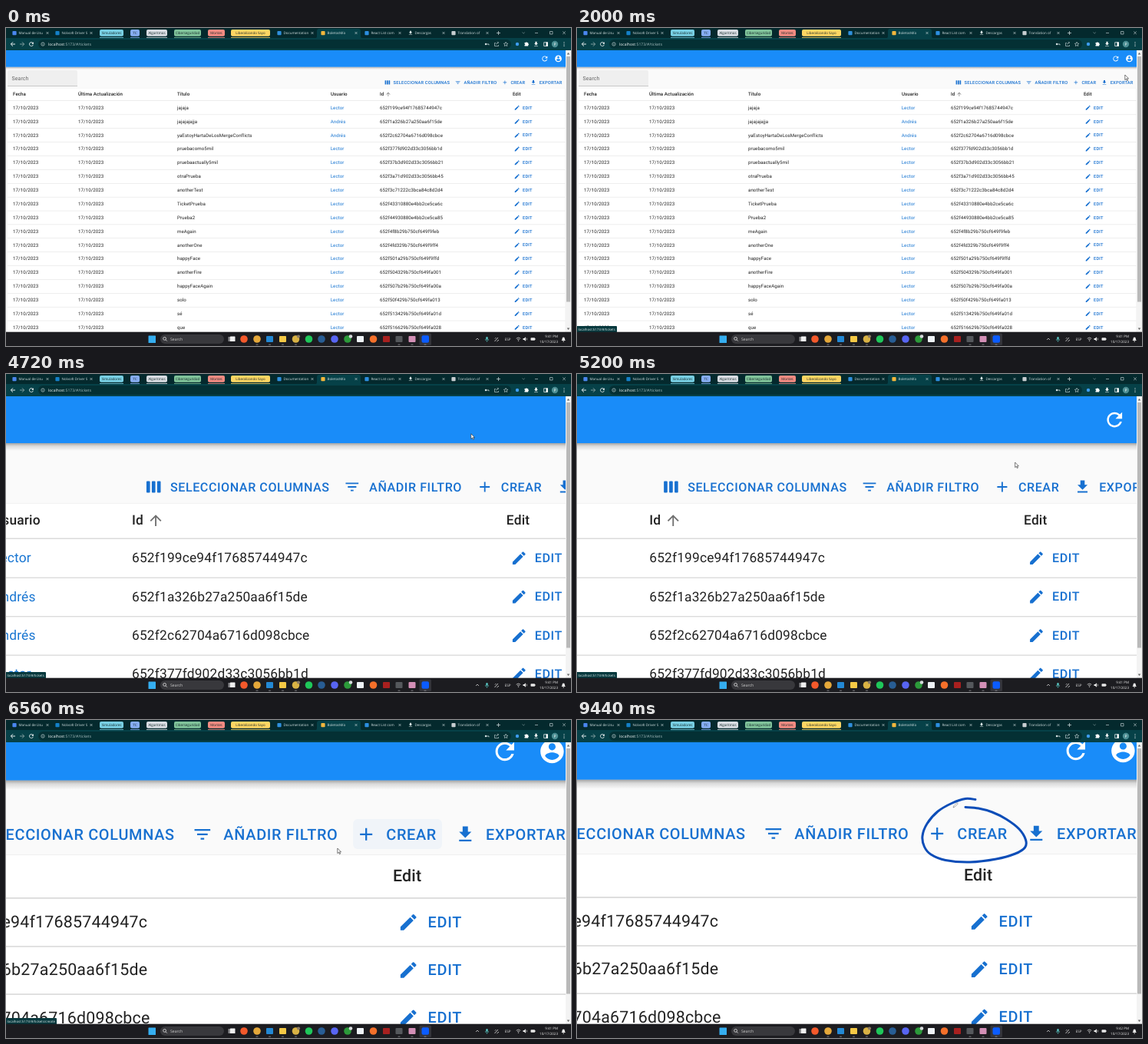
Write an HTML page that moves like this. It is 736 by 414 pixels and loops after 9.52 s.

```html
<!DOCTYPE html>
<html lang="es">
<head>
<meta charset="utf-8">
<style>
html, body { margin: 0; width: 100%; height: 100%; overflow: hidden; background: #fafafa; }
svg { display: block; width: 736px; height: 414px; }
text { text-rendering: geometricPrecision; white-space: pre; }
.cell { font: 400 6.15px Roboto, sans-serif; letter-spacing: .066px; fill: #222; }
.head { font-weight: 500; }
.link { fill: #1976d2; }
.btn { font: 500 5.71px Roboto, sans-serif; letter-spacing: .202px; fill: #1770d0; }
.ui { font-family: "Open Sans", "Noto Sans", sans-serif; }
</style>
</head>
<body>
<svg id="stage" viewBox="0 0 736 414" xmlns="http://www.w3.org/2000/svg"></svg>
<script>
const LOOP = 9520;
const stage = document.getElementById('stage');

const ICON = {
  columns: 'M3 4h3q1 0 1 1v14q0 1-1 1H3q-1 0-1-1V5q0-1 1-1zM10.5 4h3q1 0 1 1v14q0 1-1 1h-3q-1 0-1-1V5q0-1 1-1zM18 4h3q1 0 1 1v14q0 1-1 1h-3q-1 0-1-1V5q0-1 1-1z',
  filter: 'M10 18h4v-2h-4v2zM3 6v2h18V6H3zm3 7h12v-2H6v2z',
  add: 'M19 13h-6v6h-2v-6H5v-2h6V5h2v6h6v2z',
  save: 'M19 9h-4V3H9v6H5l7 7 7-7zM5 18v2h14v-2H5z',
  pencil: 'M3 17.25V21h3.75L17.81 9.94l-3.75-3.75L3 17.25zM20.71 7.04a1 1 0 0 0 0-1.41l-2.34-2.34a1 1 0 0 0-1.41 0l-1.83 1.83 3.75 3.75 1.83-1.83z',
  up: 'M4 12l1.41 1.41L11 7.83V20h2V7.83l5.58 5.59L20 12l-8-8-8 8z',
  reload: 'M17.65 6.35C16.2 4.9 14.21 4 12 4c-4.42 0-7.99 3.58-7.99 8s3.57 8 7.99 8c3.73 0 6.84-2.55 7.73-6h-2.08c-.82 2.33-3.04 4-5.65 4-3.31 0-6-2.69-6-6s2.69-6 6-6c1.66 0 3.14.69 4.22 1.78L13 11h7V4l-2.35 2.35z',
  account: 'M12 2C6.48 2 2 6.48 2 12s4.48 10 10 10 10-4.48 10-10S17.52 2 12 2zm0 3c1.66 0 3 1.34 3 3s-1.34 3-3 3-3-1.34-3-3 1.34-3 3-3zm0 14.2c-2.5 0-4.71-1.28-6-3.22.03-1.99 4-3.08 6-3.08 1.99 0 5.97 1.09 6 3.08-1.29 1.94-3.5 3.22-6 3.22z',
  star: 'M12 3l2.8 6 6.2.7-4.6 4.300 1.300 6.400L12 17.200l-5.700 3.200 1.300-6.400L3 9.700 9.200 9z',
  puzzle: 'M4 7h5a2.500 2.500 0 1 1 5 0h5v5a2.500 2.500 0 1 1 0 5v4H4v-4.500a2.500 2.500 0 1 0 0-5z'
};

const rect = (x, y, w, h, fill, r = 0, more = '') =>
  `<rect x="${x}" y="${y}" width="${w}" height="${h}" rx="${r}" fill="${fill}" ${more}/>`;
const dot = (x, y, r, fill) => `<circle cx="${x}" cy="${y}" r="${r}" fill="${fill}"/>`;
const text = (x, y, cls, str, more = '') => `<text x="${x}" y="${y}" class="${cls}" ${more}>${str}</text>`;
const ui = (x, y, size, fill, str, more = '') => text(x, y, 'ui', str, `font-size="${size}" fill="${fill}" ${more}`);
const line = (d, stroke, w = .8, more = '') => `<path d="${d}" fill="none" stroke="${stroke}" stroke-width="${w}" ${more}/>`;
// Icon on a 24-unit grid, centred at x, y
const icon = (name, x, y, size, fill) =>
  `<path d="${ICON[name]}" fill="${fill}" transform="translate(${x - size / 2} ${y - size / 2}) scale(${size / 24})"/>`;

const ROWS = [
  ['jajaja', '199ce94f17685744947c'],
  ['jajajajajja', '1a326b27a250aa6f15de'],
  ['yaEstoyHartaDeLosMergeConflicts', '2c62704a6716d098cbce'],
  ['pruebacomo5mil', '377fd902d33c3056bb1d'],
  ['pruebaactually5mil', '37b3d902d33c3056bb21'],
  ['otraPrueba', '3a71d902d33c3056bb45'],
  ['anotherTest', '3c71222c3bca84c8d2d4'],
  ['TicketPrueba', '43310880e4bb2ce5ca6c'],
  ['Prueba2', '44930880e4bb2ce5ca85'],
  ['meAgain', '4f8b29b750cf649f9feb'],
  ['anotherOne', '4fd329b750cf649f9ff4'],
  ['happyFace', '501a29b750cf649f9ffd'],
  ['anotherFire', '504329b750cf649fa001'],
  ['happyFaceAgain', '507b29b750cf649fa00a'],
  ['solo', '50f429b750cf649fa013'],
  ['sé', '513429b750cf649fa01d'],
  ['que', '516629b750cf649fa028']
];

function page() {
  const blue = '#1770d0';
  let s = rect(-20, 29, 800, 400, '#fafafa');
  s += rect(0, 50.6, 732, 3.6, 'url(#shade)') + rect(0, 20, 732, 30.7, '#198cf9');
  s += icon('reload', 701.8, 39.9, 10.5, '#fff') + icon('account', 719.5, 39.9, 10.5, '#fff');

  s += `<path d="M2 76V57q0-2 2-2h87q2 0 2 2v19z" fill="#efefef"/>` + rect(2, 75.6, 91, .45, '#949494');
  s += text(7.5, 67.6, 'ui', 'Search', 'style="font:400 7.02px Roboto,sans-serif;letter-spacing:.07px" fill="#666"');

  s += rect(645, 65.2, 33.3, 11.2, '#f0f4f9', 1.7, 'id="hover"');
  const buttons = [
    ['columns', 496.9, 504.6, 'SELECCIONAR COLUMNAS'],
    ['filter', 588.6, 596.5, 'AÑADIR FILTRO'],
    ['add', 649.9, 657.4, 'CREAR'],
    ['save', 687, 694.7, 'EXPORTAR']
  ];
  for (const [name, ix, tx, label] of buttons)
    s += icon(name, ix, 70.9, 7.9, blue) + text(tx, 73, 'btn', label);

  s += rect(1.8, 78.4, 726.8, 360, '#e9e9e9', 1.2) + rect(2, 78.6, 726.4, 360, '#fff', 1.2);
  const heads = [[9, 'Fecha'], [94, 'Última Actualización'], [223, 'Título'], [423, 'Usuario'], [486.9, 'Id'], [659.9, 'Edit']];
  for (const [x, label] of heads) s += text(x, 88.4, 'cell head', label);
  s += icon('up', 497.9, 86.4, 7.9, '#707070') + rect(2, 94.5, 726.4, .5, '#d9d9d9');

  ROWS.forEach(([title, id], i) => {
    const mid = 103.6 + i * 17.88, y = mid + 2.15;
    const user = i === 1 || i === 2 ? 'Andrés' : 'Lector';
    s += text(9, y, 'cell', '17/10/2023') + text(94, y, 'cell', '17/10/2023') + text(223, y, 'cell', title);
    s += text(422.7, y, 'cell link', user) + text(486.9, y, 'cell', '652f' + id);
    s += icon('pencil', 665.7, mid + .2, 7.9, blue) + text(673, mid + 2.05, 'btn', 'EDIT');
    s += rect(2, mid + 9, 726.4, .5, '#dcdcdc');
  });
  return s;
}

function browser() {
  const ink = '#d7e3e4', dim = '#8da6a8';
  const cross = (x, y, c = ink, r = 1.5) => line(`M${x - r} ${y - r}l${2 * r} ${2 * r}m0 ${-2 * r}l${-2 * r} ${2 * r}`, c, .6);
  let s = rect(0, 0, 736, 13.5, '#04292d') + rect(0, 13, 736, 16, '#064148');
  s += `<path d="M402 13.500q3 0 3-3V4q0-3 3-3h51q3 0 3 3v6.500q0 3 3 3z" fill="#064148"/>`;
  const tabs = [
    [11, '#4a86ee', 'Manual de Usu', 54], [67, '#1480c8', 'Nolvo® Driver S', 111],
    [356, '#2f8fdc', 'Documentation', 399], [413, '#f2b63c', 'BoletosMío', 456],
    [470, '#2c8ee0', 'React List com', 513], [527, '', 'Descargas', 570], [583, '#c7cdd0', 'Translation of', 627]
  ];
  for (const [x, color, label, close] of tabs) {
    s += color ? rect(x - 2.6, 4, 5.2, 5.2, color, 1) : icon('save', x, 6.500, 7.500, ink);
    s += ui(x + 5.500, 8.200, 4.500, ink, label) + cross(close, 6.500);
  }
  const groups = [
    [122, 31, '#78cfe3', 'Simuladores'], [162, 12, '#86adf2', 'TC'], [183, 27, '#d8dce2', 'Algoritmos'],
    [219, 35, '#80c39a', 'Ciberseguridad'], [263, 22, '#f28b82', 'Montes'], [293, 51, '#fdd663', 'Liberalizando Sayo']
  ];
  for (const [x, w, color, label] of groups) {
    s += rect(x, 2, w, 8.800, color, 2) + rect(x, 12, w, .8, color);
    s += ui(x + w / 2, 8, 4.400, '#15292b', label, 'text-anchor="middle"');
  }
  s += line('M639 6.500h5m-2.500-2.500v5', ink, .7);
  s += line('M672.500 5.500l1.700 1.700 1.700-1.700', dim, .6) + line('M689 6.500h4', ink, .6);
  s += line('M708.500 4.500h3.500v3.500h-3.500z', ink, .6) + cross(727, 6.300, ink, 1.800);

  s += line('M12 21H6.500m2.500-2.700L6.300 21 9 23.700', '#fff', .9) + line('M18 21h5.500m-2.500-2.700L23.700 21 21 23.700', dim, .9);
  s += icon('reload', 33, 21, 8.500, '#fff');
  s += rect(42, 15, 616, 12, '#043034', 6);
  s += `<circle cx="48" cy="21" r="2.200" fill="none" stroke="${ink}" stroke-width=".6"/>` + line('M48 20.600v1.600m0-2.700v.5', ink, .6);
  s += ui(55, 22.900, 5.050, '#fff', 'localhost<tspan fill="#a4bcbe">:5173/#/tickets</tspan>');
  s += dot(625, 21, 1.200, ink) + line('M626 21h3v1.300', ink, .8);
  s += line('M638 19.500h-1.500v4h5v-1.500M638.500 21.500q.5-2.500 3-2.500m-1.200-1.300l1.300 1.300-1.300 1.300', ink, .6);
  s += `<path d="${ICON.star}" transform="translate(647.500 17.400) scale(.3)" fill="none" stroke="${ink}" stroke-width="2"/>`;
  s += dot(666, 21, 2.200, '#3d9df0') + icon('puzzle', 678, 20.600, 7.500, '#fff') + icon('save', 690.500, 21, 8.500, '#fff');
  s += line('M700.700 18.700h4.800v4.800h-4.800z', '#fff', .7) + rect(703.500, 18.500, 2.200, 5.200, '#fff');
  s += dot(715, 21, 4.200, '#4d8f94') + ui(715, 22.800, 5, '#fff', 'P', 'text-anchor="middle"');
  for (const y of [18.800, 21, 23.200]) s += dot(727, y, .6, '#fff');

  s += rect(729, 29, 7, 367, '#f3f3f3') + rect(730, 37, 5, 319.500, '#b9b9b9');
  s += `<path d="M730.700 34.500l1.800-2.500 1.800 2.500zM730.700 390.500l1.800 2.500 1.800-2.500z" fill="#666"/>`;
  s += `<g id="status"><path id="bubble" fill="#07383d"/>${ui(1.500, 393.700, 4.350, '#e3eeee', '', 'id="hint"')}</g>`;
  return s;
}

function taskbar() {
  const ink = '#e8e8e8';
  let s = rect(0, 395.700, 736, 19, '#1c1c20');
  s += rect(185.500, 400.500, 9.500, 9.500, '#35aef0', .6);
  s += rect(201, 399, 83, 12, '#38383c', 6);
  s += `<circle cx="206.600" cy="404.400" r="1.900" fill="none" stroke="${ink}" stroke-width=".8"/>` + line('M208 405.800l1.800 1.800', ink, .8);
  s += ui(214, 407, 5.100, '#d0d0d0', 'Search');
  s += rect(289.500, 402, 6, 6, '#8b8b8e', .5) + rect(292, 401.500, 6.500, 6.500, '#f0f0f0', .5);
  const apps = [
    [310, '#f4592b', 1], [327, '#e5a83a', 1], [343.500, '#2388d4', 0], [360.500, '#f6c945', 0],
    [377.500, '#d9b244', 1], [394.500, '#1fc75a', 1], [411, '#285d94', 1], [428, '#5865f2', 1],
    [445, '#2c9a3a', 1], [461.500, '#eef2f6', 0], [478.500, '#f5702a', 1], [495.500, '#a8201f', 0],
    [512, '#55585c', 0], [529, '#d38fb6', 0]
  ];
  for (const [x, color, round] of apps)
    s += round ? dot(x, 405, 4.800, color) : rect(x - 4.500, 401, 9, 8, color, 1);
  s += dot(449, 401.500, 2.300, '#d6dadd') + dot(381, 401.500, 2.100, '#8a7a64');
  s += rect(538.500, 397.500, 15.500, 15.500, '#34343a', 1.500) + rect(541.500, 400.200, 9.500, 9.500, '#0b5cff', 2);
  for (const x of [327, 343.500, 360.500, 377.500, 512, 529, 546]) s += rect(x - 1.500, 411.700, 3, .9, '#9a9aa0', .4);

  s += line('M612 406l2-2 2 2', ink, .7);
  s += rect(625.300, 402, 2.400, 4, '#58c4c0', 1.200) + line('M624.300 405q0 2.300 2.200 2.300t2.200-2.300m-2.200 2.300v1.400', '#58c4c0', .6);
  s += line('M636.500 408l4.500-5m-4 1.500l1.500-1.500m1 5l2.500-2', ink, .8);
  s += ui(653.700, 406.900, 4.600, ink, 'ESP', 'text-anchor="middle"');
  s += line('M664.700 404.300q2.800-2.600 5.600 0m-4.300 1.400q1.500-1.400 3 0', ink, .7) + dot(667.500, 407.100, .7, ink);
  s += `<path d="M673.500 404h1.500l2-1.800v5.600l-2-1.800h-1.500z" fill="${ink}"/>` + line('M678 403.500q1.200 1.500 0 3', ink, .6);
  s += rect(683.500, 403.200, 5.500, 3.600, ink, .8) + rect(689.300, 404.200, .6, 1.600, ink);
  s += ui(719, 403.300, 4.500, ink, '', 'id="clock" text-anchor="end"') + ui(719, 409.800, 4.500, ink, '10/17/2023', 'text-anchor="end"');
  s += `<path d="M723.500 407q1-1 1-2.500 0-2 1.700-2t1.700 2q0 1.500 1 2.500zM725.500 407.600h1.500v.8h-1.500z" fill="${ink}"/>`;
  return s;
}

// Smooth curve through the points of the hand-drawn loop
function curve(p) {
  let d = `M${p[0]}`;
  for (let i = 0; i < p.length - 1; i++) {
    const a = p[Math.max(i - 1, 0)], b = p[i], c = p[i + 1], e = p[Math.min(i + 2, p.length - 1)];
    d += `C${b[0] + (c[0] - a[0]) / 6} ${b[1] + (c[1] - a[1]) / 6} ${c[0] - (e[0] - b[0]) / 6} ${c[1] - (e[1] - b[1]) / 6} ${c[0]} ${c[1]}`;
  }
  return d;
}
const LASSO = [
  [519, 103.5], [506, 102.5], [489, 108], [470, 119], [456, 135], [450, 151], [452.5, 165], [461, 175],
  [480, 182.5], [512, 185], [546, 181], [571, 174], [583.5, 166], [584.5, 156], [576, 142], [559, 129],
  [541, 120], [523, 115], [506, 113.5]
];

stage.innerHTML = `<defs>
  <linearGradient id="shade" x1="0" y1="0" x2="0" y2="1">
    <stop offset="0" stop-color="#000" stop-opacity=".36"/><stop offset=".4" stop-color="#000" stop-opacity=".13"/>
    <stop offset="1" stop-color="#000" stop-opacity="0"/>
  </linearGradient>
  <clipPath id="view"><rect x="0" y="29" width="729" height="367"/></clipPath></defs>
  <g clip-path="url(#view)"><g id="page">${page()}</g></g>
  ${browser()}${taskbar()}
  <path id="ink" d="${curve(LASSO)}" fill="none" stroke="#0c4db8" stroke-width="3" stroke-linecap="round" stroke-linejoin="round"/>
  <path id="arrow" d="M0 0V6.600L1.600 5.200 2.700 7.600 3.800 7.100 2.700 4.800H4.700Z" fill="#fff" stroke="#222" stroke-width=".6"/>
  <g id="pen"><path d="M0 0l1-2.300L5-6.300l1.300 1.300-4 4z" fill="#fff" stroke="#555" stroke-width=".5"/></g>`;

const el = id => document.getElementById(id);
const [pageEl, hover, statusEl, bubble, hint, clock, ink, arrow, pen] =
  ['page', 'hover', 'status', 'bubble', 'hint', 'clock', 'ink', 'arrow', 'pen'].map(el);
const inkLength = ink.getTotalLength();
const DRAW = [7600, 8900], FREEZE = 7100;

const ease = (t, a, b) => {
  const k = Math.min(1, Math.max(0, (t - a) / (b - a)));
  return k * k * (3 - 2 * k);
};
const show = (node, on) => node.setAttribute('visibility', on ? 'visible' : 'hidden');
const place = (node, x, y) => node.setAttribute('transform', `translate(${x} ${y})`);

const CURSOR = [
  [1200, 728, 112], [1900, 713.8, 61], [2200, 713.8, 61], [3400, 665.5, 53.8], [4100, 665, 55], [4720, 605.8, 77.8],
  [5560, 548, 139], [6200, 548, 139], [6520, 431.8, 167], [6800, 431.8, 167], [7500, 519, 103.5]
];
function cursorAt(t) {
  let [, x, y] = CURSOR[0];
  for (let i = 1; i < CURSOR.length; i++) {
    const k = ease(t, CURSOR[i - 1][0], CURSOR[i][0]);
    x += (CURSOR[i][1] - CURSOR[i - 1][1]) * k;
    y += (CURSOR[i][2] - CURSOR[i - 1][2]) * k;
  }
  return [x, y];
}

// Two pinches about fixed points with a sideways pan between
function camera(t) {
  let s = 2.82 ** ease(t, 3650, 4450);
  let x = 664.3 * (1 - s), y = 29.1 * (1 - s);
  x -= 139 * ease(t, 4850, 5550);
  const k = (3.48 / 2.82) ** ease(t, 5720, 6300);
  x = 551 + (x - 551) * k;
  y = 139 + (y - 139) * k;
  s *= k;
  if (t >= FREEZE) y -= .9;
  return `translate(${x} ${y}) scale(${s})`;
}

function draw(t) {
  pageEl.setAttribute('transform', camera(t));
  show(hover, t >= 5720 && t < FREEZE);

  show(statusEl, t >= 1300 && t < FREEZE);
  const create = t >= 5360, w = create ? 66 : 52;
  hint.textContent = 'localhost:5173/#/tickets' + (create ? '/create' : '');
  bubble.setAttribute('d', `M0 388h${w - 1}q1 0 1 1v7H0z`);
  clock.textContent = t < FREEZE ? '9:41 PM' : '9:42 PM';

  const k = ease(t, ...DRAW);
  show(ink, k > 0);
  ink.setAttribute('stroke-dasharray', `${k * inkLength} ${inkLength * 2}`);

  const [x, y] = cursorAt(t);
  show(arrow, t >= 1200 && t < FREEZE);
  place(arrow, x, y);
  show(pen, t >= FREEZE);
  if (k > 0) {
    const p = ink.getPointAtLength(k * inkLength), out = ease(t, 8950, 9300);
    place(pen, p.x + (490 - p.x) * out, p.y + (114 - p.y) * out);
  } else place(pen, x, y);
}

function tick() {
  draw(performance.now() % LOOP);
  requestAnimationFrame(tick);
}
tick();
</script>
</body>
</html>
```
